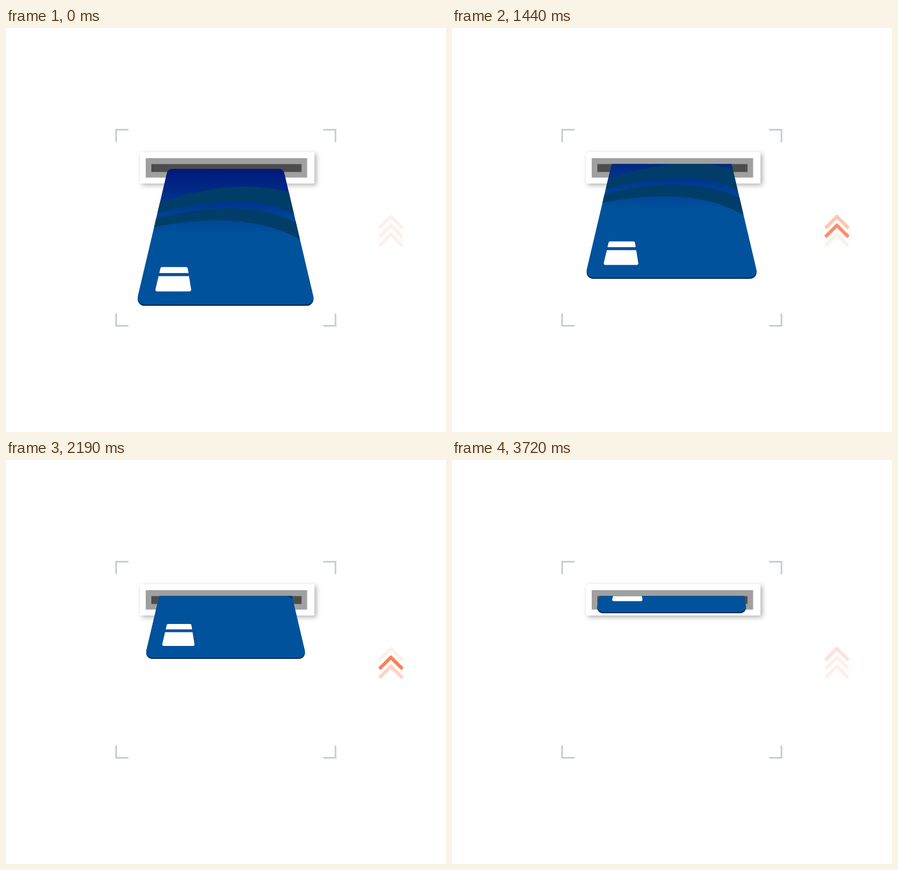
An HTML page with a canvas that plays this animation: 781 px wide and 717 px high, repeating every 3.75 s.

```html
<!DOCTYPE html>
<html lang="en">
<head>
<meta charset="utf-8">
<title>Card slot</title>
<style>
  html, body { margin: 0; width: 100%; height: 100%; overflow: hidden; background: #fff; }
  canvas { display: block; }
</style>
</head>
<body>
<canvas id="stage" width="781" height="717"></canvas>
<script>
const ctx = document.getElementById('stage').getContext('2d');
const LOOP = 3750, STEP = 30;
const CARD = { cx: 389.75, top: 250, bottom: 490.5, halfTop: 102.5, halfBottom: 159.2, base: 493 };
const SLOT_TOP = 241.5;

const clamp01 = v => Math.min(1, Math.max(0, v));

function rect(color, x0, y0, x1, y1) {
  ctx.fillStyle = color;
  ctx.fillRect(x0, y0, x1 - x0, y1 - y0);
}

// Closed path with one rounding radius per corner.
function roundedPath(corners) {
  const n = corners.length;
  const [a, b] = [corners[n - 1], corners[0]];
  ctx.beginPath();
  ctx.moveTo((a[0] + b[0]) / 2, (a[1] + b[1]) / 2);
  corners.forEach(([x, y, r], i) => {
    const next = corners[(i + 1) % n];
    ctx.arcTo(x, y, next[0], next[1], r);
  });
  ctx.closePath();
}

function cardPath(dy) {
  const { cx, top, bottom, halfTop, halfBottom } = CARD;
  roundedPath([
    [cx - halfTop, top + dy, 9], [cx + halfTop, top + dy, 9],
    [cx + halfBottom, bottom + dy, 12], [cx - halfBottom, bottom + dy, 12]
  ]);
}

// Band between two quadratic curves, each given as start, control, end.
function band(upper, lower) {
  ctx.beginPath();
  ctx.moveTo(upper[0], upper[1]);
  ctx.quadraticCurveTo(...upper.slice(2));
  ctx.lineTo(lower[4], lower[5]);
  ctx.quadraticCurveTo(lower[2], lower[3], lower[0], lower[1]);
  ctx.fill();
}

function drawBrackets() {
  const color = '#c3d0d6', len = 23.5, w = 3;
  for (const [x, dx] of [[194, 1], [586.3, -1]]) {
    for (const [y, dy] of [[179, 1], [530, -1]]) {
      rect(color, x, y, x + dx * len, y + dy * w);
      rect(color, x, y, x + dx * w, y + dy * len);
    }
  }
}

function drawSlot() {
  ctx.save();
  ctx.shadowColor = 'rgba(0,0,0,.3)';
  ctx.shadowBlur = 8;
  ctx.shadowOffsetX = ctx.shadowOffsetY = 3;
  rect('#fff', 238, 220, 547.5, 276);
  ctx.restore();
  rect('#a0a0a0', 248, 231, 534.5, 265.5);
  rect('#4d4d4d', 258, SLOT_TOP, 524.5, 255.5);
}

function drawCard(t) {
  const p = clamp01((t - 1050) / 1800);
  const scale = 1 - 0.1534 * p;
  ctx.save();
  ctx.beginPath();
  ctx.rect(0, SLOT_TOP, 781, 717);
  ctx.clip();
  ctx.translate(CARD.cx, CARD.base - 221 * p);
  ctx.scale(scale, scale);
  ctx.translate(-CARD.cx, -CARD.base);

  cardPath(2.6);
  ctx.fillStyle = '#002d5c';
  ctx.fill();

  const blue = ctx.createLinearGradient(0, CARD.top, 0, 365);
  blue.addColorStop(0, '#00177b');
  blue.addColorStop(1, '#00529c');
  cardPath(0);
  ctx.fillStyle = blue;
  ctx.fill();

  ctx.save();
  ctx.clip();
  ctx.fillStyle = '#003d69';
  band([273, 309.5, 411, 263.4, 503, 292.3], [268, 328.3, 434, 284.5, 512, 331.5]);
  band([265.5, 338.3, 416, 299.6, 515, 343.7], [262, 353.3, 426, 320.8, 522.5, 375.7]);
  ctx.restore();

  roundedPath([[274.6, 424.3, 3], [322.2, 424.3, 3], [329.2, 467.6, 3], [264.4, 467.6, 3]]);
  ctx.fillStyle = '#fff';
  ctx.fill();
  rect('#00529c', 262, 434.9, 332, 440.4);
  ctx.restore();
}

// Triangular pulse: 300 ms up, 300 ms down, every 900 ms.
function pulse(t, firstPeak) {
  if (t < firstPeak) return clamp01(1 - (firstPeak - t) / Math.min(300, firstPeak));
  if (t > firstPeak + 3000) return 0;
  const phase = (t - firstPeak) % 900;
  return clamp01(1 - Math.min(phase, 900 - phase) / 300);
}

function drawChevron(tipY, level) {
  const alpha = 0.1 + 0.9 * level;
  const color = `rgb(255,${Math.round(255 - 157 * alpha)},${Math.round(255 - 207 * alpha)})`;
  ctx.save();
  ctx.translate(683.2, tipY);
  ctx.beginPath();
  ctx.moveTo(0, 2.1);
  ctx.lineTo(20.5, 22.6);
  ctx.lineTo(18.4, 24.8);
  ctx.lineTo(0, 6.4);
  ctx.lineTo(-18.4, 24.8);
  ctx.lineTo(-20.5, 22.6);
  ctx.closePath();
  ctx.fillStyle = ctx.strokeStyle = color;
  ctx.lineWidth = 3;
  ctx.lineJoin = 'round';
  ctx.fill();
  ctx.stroke();
  ctx.restore();
}

function draw(t) {
  rect('#fff', 0, 0, 781, 717);
  drawBrackets();
  drawSlot();
  drawCard(t);
  drawChevron(330.4, pulse(t, 750));
  drawChevron(346, pulse(t, 450));
  drawChevron(362, pulse(t, 150));
}

let start;
function tick(now) {
  start ??= now;
  const t = (now - start) % LOOP;
  draw(Math.floor(t / STEP) * STEP);
  requestAnimationFrame(tick);
}
draw(0);
requestAnimationFrame(tick);
</script>
</body>
</html>
```
